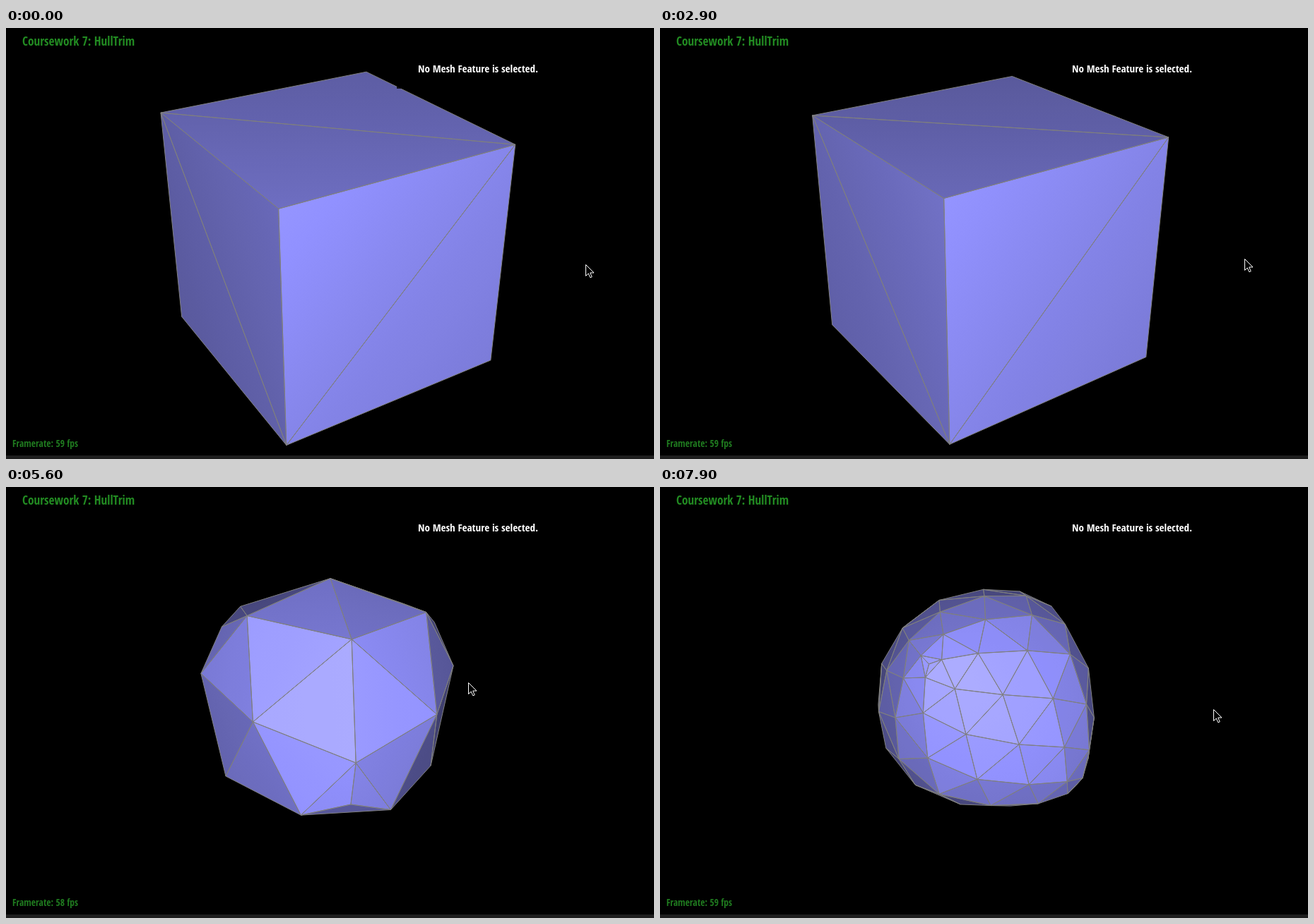
Write an HTML page with a canvas that moves like this. It is 917x611 px and loops after 8000 ms.

```html
<!DOCTYPE html>
<html lang="en">
<head>
<meta charset="utf-8">
<title>Mesh subdivision</title>
<style>
  html, body { margin: 0; width: 917px; height: 611px; overflow: hidden; background: #000; }
  canvas, svg { position: absolute; left: 0; top: 0; display: block; }
  text { font-family: "Open Sans Condensed", "Open Sans", sans-serif; font-weight: 700; font-stretch: 75%; }
</style>
</head>
<body>
<canvas id="stage" width="917" height="611"></canvas>
<svg width="917" height="611">
  <text x="23" y="25" font-size="17.3" fill="#228b22">Coursework 7: HullTrim</text>
  <text x="583" y="63" font-size="15.1" fill="#fff">No Mesh Feature is selected.</text>
  <text id="fps" x="9" y="594" font-size="13.5" fill="#1f7a1f"></text>
  <path id="pointer" d="M.5.5V16.5L4.2 13 6.8 18.8 9.2 17.8 6.7 12H12Z" fill="#000" stroke="#fff"/>
</svg>
<script>
const ctx = document.getElementById('stage').getContext('2d');
const fpsLabel = document.getElementById('fps');
const pointer = document.getElementById('pointer');

const LOOP = 8000, TICK = 100;
const FOCAL = 1211, DISTANCE = 7.14, CX = 459, CY = 300.5;
const MS_PER_DEGREE = 50;

// Where each drag ends: time, elevation and azimuth of the camera.
const POSES = [
  [0, 29.3, 58.5],
  [900, 33, 71.5],
  [1200, 24.4, 71.2],
  [1800, 23.8, 55.5],
  [2900, 26.8, 55.5],
  [5100, 25.2, 58.6],
  [5600, 12, 125],
  [6200, 11, 154.5],
  [6600, 11, 154.5],
  [7200, 30.3, 114],
  [7900, 23.4, 73.2]
];

const sub = (a, b) => a.map((v, i) => v - b[i]);
const dot = (a, b) => a[0] * b[0] + a[1] * b[1] + a[2] * b[2];
const cross = (a, b) => [a[1] * b[2] - a[2] * b[1], a[2] * b[0] - a[0] * b[2], a[0] * b[1] - a[1] * b[0]];
const unit = a => a.map(v => v / Math.hypot(...a));
// Weighted sum of [weight, point] pairs.
const blend = terms => [0, 1, 2].map(i => terms.reduce((sum, [w, p]) => sum + w * p[i], 0));

// Cube whose face diagonals form a tetrahedron.
function makeCube() {
  const verts = [], tris = [];
  for (let i = 0; i < 8; i++) {
    const p = [1, 2, 4].map(bit => i & bit ? 1 : -1);
    verts.push(p);
    if (p[0] * p[1] * p[2] > 0)
      tris.push([i, i ^ 1, i ^ 2], [i, i ^ 2, i ^ 4], [i, i ^ 4, i ^ 1]);
  }
  return { verts, tris };
}

// One round of Loop subdivision.
function subdivide({ verts, tris }) {
  const edges = new Map(), near = verts.map(() => new Set());
  const edgeOf = (a, b) => {
    const key = Math.min(a, b) + '-' + Math.max(a, b);
    if (!edges.has(key)) edges.set(key, { a, b, opposite: [], id: verts.length + edges.size });
    return edges.get(key);
  };
  const split = tris.flatMap(([a, b, c]) => {
    const [ab, bc, ca] = [[a, b, c], [b, c, a], [c, a, b]].map(([p, q, r]) => {
      const edge = edgeOf(p, q);
      edge.opposite.push(r);
      near[p].add(q).add(r);
      return edge.id;
    });
    return [[a, ab, ca], [b, bc, ab], [c, ca, bc], [ab, bc, ca]];
  });
  const moved = verts.map((p, i) => {
    const n = near[i].size, w = n === 3 ? 3 / 16 : 3 / (8 * n);
    return blend([[1 - n * w, p], ...[...near[i]].map(j => [w, verts[j]])]);
  });
  const added = [...edges.values()].map(e => blend([
    [3 / 8, verts[e.a]], [3 / 8, verts[e.b]], ...e.opposite.map(j => [1 / 8, verts[j]])
  ]));
  return { verts: moved.concat(added), tris: split };
}

const cube = makeCube(), once = subdivide(cube), twice = subdivide(once);

// The camera rests in a pose, then turns in time to reach the next one.
function cameraAt(t) {
  const next = POSES.findIndex(pose => pose[0] >= t);
  const [start, ...from] = POSES[Math.max(0, next - 1)];
  const [end, ...to] = POSES[next];
  const turn = sub(to, from);
  const duration = Math.min(end - start, MS_PER_DEGREE * Math.hypot(...turn)) || 1;
  const k = Math.max(0, 1 - (end - t) / duration);
  return from.map((v, i) => v + turn[i] * k);
}

const shade = i => `rgb(${i * 0.57},${i * 0.57},${Math.min(255, i)})`;

// Linear gradient that carries the light of three corners [x, y, light].
function gradient([[x, y, i], [x1, y1, i1], [x2, y2, i2]]) {
  const dx1 = x1 - x, dy1 = y1 - y, dx2 = x2 - x, dy2 = y2 - y;
  const det = dx1 * dy2 - dx2 * dy1;
  if (Math.abs(det) < 1) return shade(i);
  const a = ((i1 - i) * dy2 - (i2 - i) * dy1) / det;
  const b = ((i2 - i) * dx1 - (i1 - i) * dx2) / det;
  const g = a * a + b * b;
  if (g < 1e-6) return shade(i);
  const lo = Math.min(i, i1, i2), hi = Math.max(i, i1, i2);
  const from = (lo - i) / g, to = (hi - i) / g;
  const fill = ctx.createLinearGradient(x + a * from, y + b * from, x + a * to, y + b * to);
  for (let k = 0; k <= 4; k++) fill.addColorStop(k / 4, shade(lo + (hi - lo) * k / 4));
  return fill;
}

function drawMesh({ verts, tris }, elevation, azimuth) {
  const rad = Math.PI / 180;
  const sp = Math.sin(elevation * rad), cp = Math.cos(elevation * rad);
  const sa = Math.sin(azimuth * rad), ca = Math.cos(azimuth * rad);
  const eye = [-DISTANCE * cp * ca, -DISTANCE * cp * sa, DISTANCE * sp];
  const screen = verts.map(([u, v, z]) => {
    const ahead = u * ca + v * sa;
    const scale = FOCAL / (DISTANCE + ahead * cp - z * sp);
    return [CX + (u * sa - v * ca) * scale, CY - (ahead * sp + z * cp) * scale];
  });
  const wires = new Path2D();
  for (const tri of tris) {
    const [a, b, c] = tri.map(i => verts[i]);
    const normal = unit(cross(sub(b, a), sub(c, a)));
    if (dot(normal, sub(eye, a)) <= 0) continue;
    const corners = tri.map(i => [...screen[i], 100 + 205 * dot(normal, unit(sub(eye, verts[i])))]);
    const face = new Path2D();
    corners.forEach(([x, y]) => face.lineTo(x, y));
    face.closePath();
    ctx.fillStyle = gradient(corners);
    ctx.fill(face);
    wires.addPath(face);
  }
  ctx.strokeStyle = '#808080';
  ctx.lineWidth = 1;
  ctx.lineJoin = 'round';
  ctx.stroke(wires);
}

function render() {
  const t = Math.floor(performance.now() % LOOP / TICK) * TICK;
  const [elevation, azimuth] = cameraAt(t);
  ctx.fillStyle = '#000';
  ctx.fillRect(0, 0, 917, 611);
  drawMesh(t < 4600 ? cube : t < 6400 ? once : twice, elevation, azimuth);
  ctx.fillStyle = 'rgba(0,0,0,.8)';
  ctx.fillRect(553, 30, 230, 56);
  ctx.fillStyle = '#1e1e1e';
  ctx.fillRect(0, 606, 917, 5);
  const slow = t >= 4900 && t < 5800 || t >= 6900 && t < 7700;
  fpsLabel.textContent = `Framerate: ${slow ? 58 : 59} fps`;
  // The pointer drags the view, so its place follows from the angles.
  const x = Math.round(966 - 2.5 * azimuth), y = Math.round(237 + 3.35 * elevation);
  pointer.setAttribute('transform', `translate(${x} ${y})`);
  requestAnimationFrame(render);
}
render();
</script>
</body>
</html>
```
